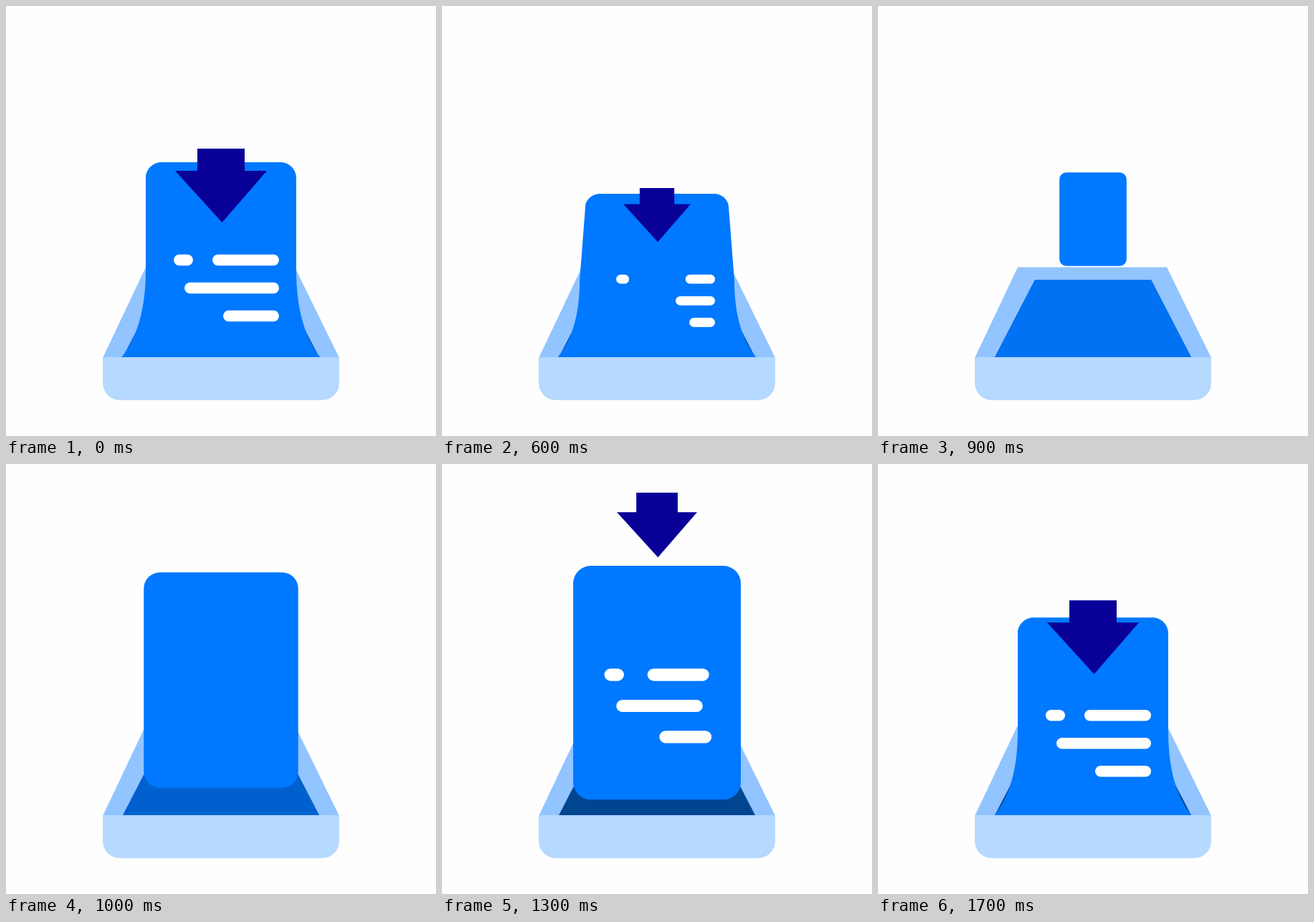
Write an HTML page that moves like this. It is 600x600 px and loops after 1800 ms.

```html
<!DOCTYPE html>
<html lang="en">
<head>
<meta charset="utf-8">
<title>Document into tray</title>
<style>
  html, body { margin: 0; width: 100%; height: 100%; overflow: hidden; background: #fefefe; }
  svg { display: block; width: 100%; height: 100%; }
  .paper { fill: #0078ff; }
  #lines { fill: none; stroke: #fff; stroke-linecap: round; }
</style>
</head>
<body>
<svg viewBox="0 0 600 600">
  <path fill="#92c4ff" d="M195 364.5H403L465 491H135Z"/>
  <path fill="#004590" d="M219 382H381L437.500 491H162.500Z"/>
  <path id="floor" class="paper" d="M219 382H381L437.500 491H162.500Z"/>
  <path id="sheet" class="paper"/>
  <rect id="card" class="paper" x="-105" width="210" height="293" rx="22"/>
  <path id="lines"/>
  <path id="arrow" fill="#090098" d="M-33 0H33V31H64L1.500 103L-64 31H-33Z"/>
  <path fill="#b6d9ff" d="M135 490H465V526a24 24 0 0 1-24 24H159a24 24 0 0 1-24-24Z"/>
</svg>
<script>
const LOOP = 1800, STEP = 100, CARD_HEIGHT = 293;
const part = id => document.getElementById(id);
const [floor, sheet, card, lines, arrow] = ['floor', 'sheet', 'card', 'lines', 'arrow'].map(part);

const mix = (a, b, p) => a + (b - a) * p;
const progress = (t, from, to) => Math.min(1, Math.max(0, (t - from) / (to - from)));
const easeOut = (p, power) => 1 - (1 - p) ** power;

// Row, left, right, relative to the paper's middle
const strokes = [[0, -66, -39], [0, -12, 81], [1, -51, 81], [2, 3, 81]];
const fullText = { length: 1, first: 136.5, gap: 39, thick: 15.4 };

// The bent sheet flattens into the tray while its contents shrink.
function sink(t) {
  const p = progress(t, 400, 800), e = p ** 1.9;
  const top = mix(218, 382, e);
  return {
    sheet: {
      top, half: mix(105, 81, e), corner: mix(22, 10, e), bend: mix(105, 116, e),
      bendY: mix(368, 425, e), foot: 141, footY: 493
    },
    text: {
      length: (1 - p) ** 1.5, first: mix(136.5, 72, e), gap: mix(39, 6, e),
      thick: mix(15.4, 6, e), y: top, scale: 1, alignRight: true
    },
    arrow: { y: mix(199, 404, e), scale: 1 - e }
  };
}

// A new card pops up, settles to size and gets its text and arrow.
function rise(t) {
  const grow = progress(t, 800, 1100), settle = progress(t, 1100, 1500);
  const scale = 1.181 * easeOut(grow ** 1.75, 3) - .181 * settle ** 1.43;
  const middle = mix(293.5, 305.5, grow);
  const y = settle ? mix(132, 165, settle ** 1.72) : middle - CARD_HEIGHT * scale / 2;
  return {
    card: { y, scale },
    text: { ...fullText, length: easeOut(settle, 2.3), y, scale },
    arrow: { y: mix(36, 76, settle ** 3.3), scale: easeOut(settle, 3) },
    blueFloor: 1 - grow ** 2
  };
}

// Arrow and sheet drop into the tray, the foot spreading out.
function land(t) {
  const e = easeOut(progress(t, 1500, 1800), 2.4);
  const top = mix(165, 218, e);
  return {
    sheet: {
      top, half: 105, corner: 22, bend: 105, bendY: mix(428, 368, e),
      foot: mix(92, 141, e), footY: mix(456, 493, e)
    },
    text: { ...fullText, y: top, scale: 1 },
    arrow: { y: mix(76, 199, e), scale: 1 }
  };
}

function sheetPath({ top, half, corner, bend, bendY, foot, footY }) {
  const h = footY - bendY, pull = mix(bend, foot, .35);
  const shoulder = mix(half, bend, corner / (bendY - top)), k = corner * .45;
  const at = (side, x, y) => `${300 + side * x} ${y}`;
  const R = (x, y) => at(1, x, y), L = (x, y) => at(-1, x, y);
  const c1 = bendY + h * .45, c2 = bendY + h * .78;
  return `M${L(half - corner, top)}L${R(half - corner, top)}
    C${R(half - k, top)} ${R(shoulder, top + k)} ${R(shoulder, top + corner)}
    L${R(bend, bendY)}C${R(bend, c1)} ${R(pull, c2)} ${R(foot, footY)}
    L${L(foot, footY)}C${L(pull, c2)} ${L(bend, c1)} ${L(bend, bendY)}
    L${L(shoulder, top + corner)}
    C${L(shoulder, top + k)} ${L(half - k, top)} ${L(half - corner, top)}Z`;
}

function linesPath({ length, first, gap, thick, alignRight }) {
  return strokes.map(([row, left, right]) => {
    const a = left + thick / 2, b = right - thick / 2, core = (b - a) * length;
    return `M${alignRight ? b - core : a} ${first + row * gap}h${core}`;
  }).join('');
}

function show(el, on) {
  el.setAttribute('visibility', on ? 'visible' : 'hidden');
}

function place(el, { y, scale }) {
  el.setAttribute('transform', `translate(300 ${y}) scale(${scale})`);
}

function draw(t) {
  const scene = t < 800 ? sink(t) : t < 1500 ? rise(t) : land(t);
  floor.setAttribute('opacity', scene.blueFloor ?? 0);
  show(sheet, scene.sheet);
  if (scene.sheet) sheet.setAttribute('d', sheetPath(scene.sheet));
  show(card, scene.card);
  if (scene.card) place(card, scene.card);
  show(lines, scene.text.length > 0);
  lines.setAttribute('d', linesPath(scene.text));
  lines.setAttribute('stroke-width', scene.text.thick);
  place(lines, scene.text);
  show(arrow, scene.arrow.scale > 0);
  place(arrow, scene.arrow);
}

const start = performance.now();
function tick(now) {
  const t = Math.max(0, now - start) % LOOP;
  draw(Math.floor(t / STEP) * STEP);
  requestAnimationFrame(tick);
}
draw(0);
requestAnimationFrame(tick);
</script>
</body>
</html>
```
